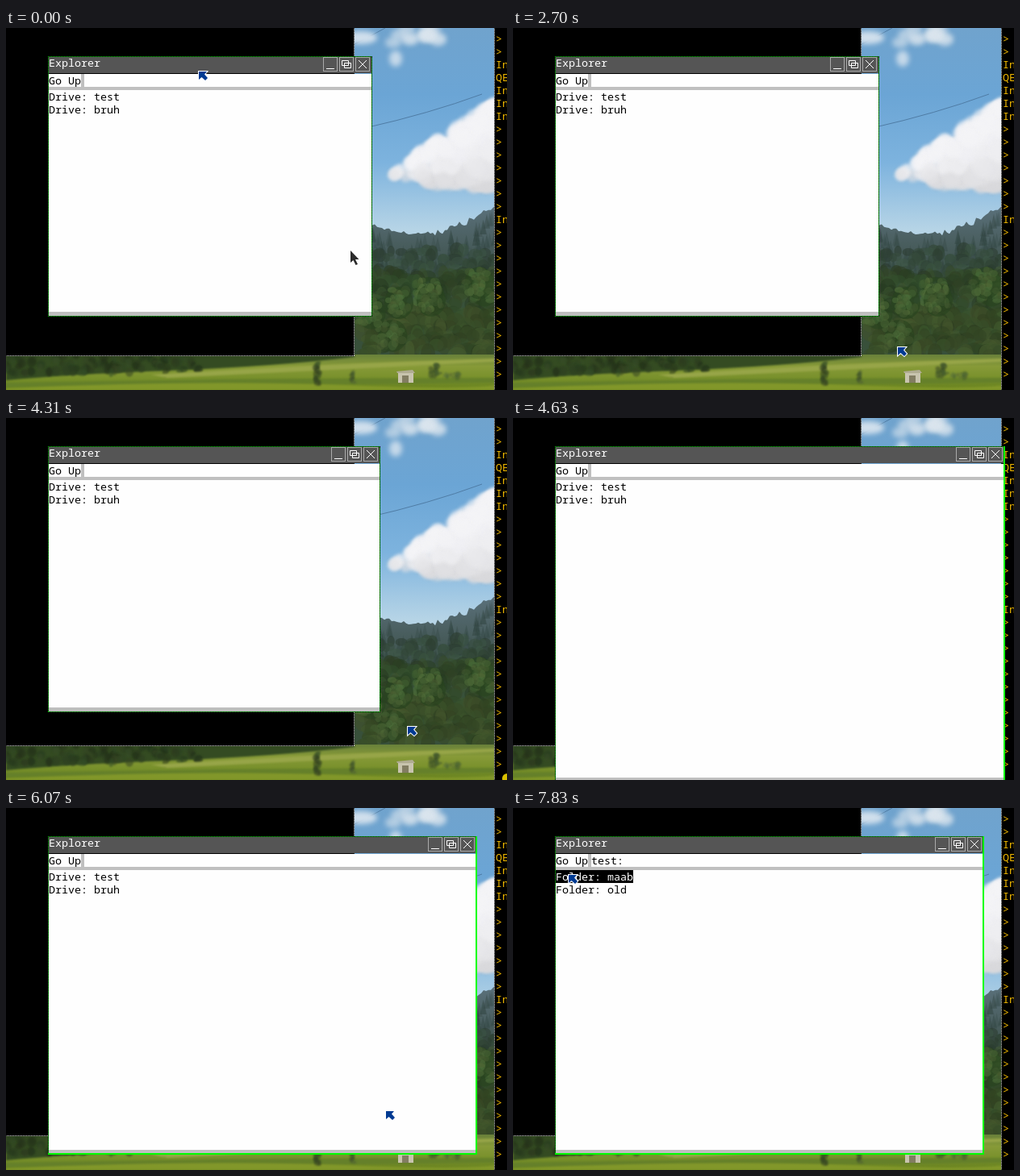
Animation of 621x449 px, one loop 7.99 s. Source, as an HTML page with a canvas:

```html
<!DOCTYPE html>
<html lang="en">
<head>
<meta charset="utf-8">
<title>Explorer</title>
<style>
  html, body { margin: 0; width: 100%; height: 100%; overflow: hidden; background: #000; }
  #stage {
    position: relative; width: 621px; height: 449px; overflow: hidden;
    font: 300 13.333px/16px "Noto Sans Mono", "DejaVu Sans Mono", monospace;
    --dot: #ccc;
    --time: 7990ms -30ms infinite;
  }
  #stage * { position: absolute; box-sizing: border-box; }
  .text { white-space: pre; margin: 0; font: inherit; }
  .dotted {
    --x: repeating-linear-gradient(90deg, var(--dot) 0 1px, #111 1px 2px);
    --y: repeating-linear-gradient(var(--dot) 0 1px, #111 1px 2px);
    background: var(--x) 0 0 / 100% 1px no-repeat, var(--x) 0 100% / 100% 1px no-repeat,
                var(--y) 0 0 / 1px 100% no-repeat, var(--y) 100% 0 / 1px 100% no-repeat;
  }
  #shell { left: -1px; top: -1px; width: 433px; height: 408px; background-color: #000; }
  #terminal { left: 605px; top: -1px; width: 20px; height: 460px; background-color: #000; }
  #terminal .text { left: 2px; top: 6px; color: #f0b800; }
  #spot {
    left: 615px; top: 441px; width: 12px; height: 12px; border-radius: 50%; background: #d8c000;
    animation: blip var(--time) step-end;
  }

  #window { left: 52px; top: 35px; animation: resize var(--time); }
  #title { left: 1px; right: 1px; top: 1px; height: 20px; background: #555; color: #fff; }
  #title .text { top: -1px; }
  #title svg { top: 0; width: 18px; height: 18px; fill: #555; stroke: #fff; }
  #title rect { x: .5px; y: .5px; width: 17px; height: 17px; stroke: #aaa; }
  #path, #list { left: 1px; right: 1px; background: #fefefe; border: 0 solid #bfbfbf; }
  #path { top: 22px; height: 20px; border-bottom-width: 4px; }
  #split { left: 40px; width: 4px; height: 16px; background: #bfbfbf; }
  #place { left: 44px; }
  #list { top: 42px; bottom: 1px; border-bottom-width: 5px; }
  #list .text + .text { top: 16px; }
  #edge { inset: 0; --dot: #0c0; }
  #lit { inset: 0; border: solid #0f0; border-width: 0 2px 2px 0; animation: light var(--time) step-end; }

  .before { animation: leave var(--time) step-end; }
  .after { animation: enter var(--time) step-end; }
  .row { animation: pick var(--time) step-end; }
  .cursor { width: 16px; height: 22px; overflow: visible; }
  .cursor path { paint-order: stroke; stroke: #fff; stroke-width: 2; }
  #guest { animation: guest var(--time); }
  #host { animation: host var(--time); }

  /* One picture lasts 2%; each steps() count is the number of pictures to the next key. */
  @keyframes host {
    0% { left: 427px; top: 276px; visibility: visible; animation-timing-function: steps(8); }
    16% { left: 261px; top: 71px; animation-timing-function: steps(3); }
    22% { left: 235px; top: 39px; visibility: visible; animation-timing-function: steps(1); }
    24%, 100% { left: 235px; top: 39px; visibility: hidden; }
  }
  @keyframes guest {
    0%, 22% { left: 238px; top: 53px; animation-timing-function: steps(3); }
    28% { left: 238px; top: 70px; animation-timing-function: steps(3); }
    34% { left: 476px; top: 395px; animation-timing-function: steps(2); }
    38% { left: 468px; top: 417px; animation-timing-function: steps(3); }
    44% { left: 449px; top: 353px; animation-timing-function: steps(4); }
    52% { left: 463px; top: 364px; animation-timing-function: steps(1); }
    54% { left: 497px; top: 382px; animation-timing-function: steps(2); }
    58% { left: 625px; top: 465px; animation-timing-function: steps(7); }
    72% { left: 577px; top: 420px; animation-timing-function: steps(2); }
    76% { left: 470px; top: 375px; animation-timing-function: steps(3); }
    82%, 86% { left: -30px; top: 132px; animation-timing-function: steps(1); }
    88% { left: 28px; top: 93px; animation-timing-function: steps(3); }
    94%, 100% { left: 68px; top: 82px; }
  }
  @keyframes resize {
    0%, 44% { width: 402px; height: 323px; animation-timing-function: steps(5); }
    54% { width: 412px; height: 330px; animation-timing-function: steps(2); }
    58% { width: 558px; height: 417px; animation-timing-function: steps(2); }
    62% { width: 589px; height: 441px; animation-timing-function: steps(5); }
    72%, 100% { width: 532px; height: 395px; }
  }
  @keyframes blip { 0%, 56%, 100% { visibility: hidden; } 54% { visibility: visible; } }
  @keyframes light { 0% { visibility: hidden; } 56%, 100% { visibility: visible; } }
  @keyframes leave { 0% { opacity: 1; } 96%, 100% { opacity: 0; } }
  @keyframes enter { 0% { opacity: 0; } 96%, 100% { opacity: 1; } }
  @keyframes pick {
    0% { color: #000; background: #fefefe; }
    92%, 100% { color: #fff; background: #000; }
  }
</style>
</head>
<body>
<div id="stage">
  <canvas id="photo" width="621" height="449"></canvas>
  <div id="shell" class="dotted"></div>
  <div id="terminal" class="dotted"><pre class="text"></pre></div>
  <div id="spot"></div>
  <div id="window">
    <div id="title">
      <span class="text">Explorer</span>
      <svg style="right:42px"><rect/><path d="M4 14.5H14"/></svg>
      <svg style="right:22px"><rect/><path d="M3.5 4.5H11.5V10.5H3.5ZM6.5 7.5H14.5V13.5H6.5Z"/></svg>
      <svg style="right:2px"><rect/><path d="M4 4L14 14M14 4L4 14"/></svg>
    </div>
    <div id="path">
      <span class="text">Go Up</span><div id="split"></div><span id="place" class="text after">test:</span>
    </div>
    <div id="list">
      <div class="before"><span class="text row">Drive: test</span><span class="text">Drive: bruh</span></div>
      <div class="after"><span class="text row">Folder: maab</span><span class="text">Folder: old</span></div>
    </div>
    <div id="edge" class="dotted"></div>
    <div id="lit"></div>
  </div>
  <svg id="guest" class="cursor"><path fill="#003a92" d="M1 1H11L8 4.5L12 9L9 12L4.5 8L1 11Z"/></svg>
  <svg id="host" class="cursor"><path fill="#2b2b2b" d="M0 0V15L3.5 12L6.5 18L9 17L6 11H10.5Z"/></svg>
</div>
<script>
const c = document.getElementById('photo').getContext('2d');
let seed = 7;
const rnd = () => (seed = seed * 16807 % 2147483647) / 2147483647;
const between = (a, b) => a + (b - a) * rnd();

function fade(y0, y1, ...colors) {
  const g = c.createLinearGradient(0, y0, 0, y1);
  colors.forEach((color, i) => g.addColorStop(i / (colors.length - 1), color));
  return g;
}

function blob(fill, x, y, rx, ry = rx) {
  c.fillStyle = fill;
  c.beginPath();
  c.ellipse(x, y, rx, ry, 0, 0, 7);
  c.fill();
}

function path(d, fill) {
  c.fillStyle = fill;
  c.fill(new Path2D(d));
}

function foliage(count, x, y, w, h, size, hue, sat, light) {
  for (let i = 0; i < count; i++) {
    const color = `hsla(${hue + between(-8, 8)},${sat}%,${light + between(-5, 5)}%,.55)`;
    blob(color, x + w * rnd(), y + h * i / count, size * between(.5, 1), size * between(.5, 1.1));
  }
}

function paintSky() {
  c.fillStyle = fade(0, 250, '#70a3cd', '#6ba5d5', '#7db3de', '#b6d4e6');
  c.fillRect(0, 0, 621, 449);
  c.strokeStyle = '#4f7ca5';
  c.stroke(new Path2D('M432 20Q452 10 470 0M445 124Q525 106 590 82'));

  c.filter = 'blur(3px)';
  for (let i = 0; i < 14; i++) blob('#dce6ef99', between(480, 540), between(-4, 20), 10, 7);
  blob('#d0dfec', 440, 12, 20, 8);
  blob('#c4d8e9', 483, 38, 8, 10);

  // The big cloud widens from its left tip to the right.
  c.filter = 'blur(2px)';
  for (let i = 0; i < 260; i++) {
    const t = Math.sqrt(rnd()), low = rnd(), r = 7 + 7 * t;
    const top = 182 - 100 * t ** .8 + r, bottom = 186 + 22 * Math.sin(2.2 * t) - r;
    const shade = 243 - 28 * low ** 3;
    blob(`rgba(${shade},${shade},${shade + 3},.7)`, 476 + 134 * t, top + Math.max(0, bottom - top) * low, r);
  }
  c.filter = 'none';
}

function paintForest() {
  const ridge = x => 255 - .0036 * (x - 510) ** 2;
  c.filter = 'blur(.7px)';
  c.fillStyle = fade(222, 330, '#5a707a', '#465a59', '#38503a');
  c.beginPath();
  c.moveTo(430, 410);
  for (let x = 430; x < 621; x += 3) c.lineTo(x, ridge(x) + between(-4, 3) * (x > 530 ? 1.4 : .5));
  c.lineTo(621, 410);
  c.fill();
  for (let i = 0; i < 90; i++) {
    const x = between(440, 610), y = ridge(x) + between(5, 45);
    path(`M${x - 4} ${y + 13}L${x} ${y - 5}L${x + 4} ${y + 13}Z`, `rgba(48,68,64,${between(.2, .5)})`);
  }
  foliage(110, 440, 275, 172, 40, 9, 135, 17, 24);
  foliage(220, 440, 304, 172, 65, 11, 102, 28, 22);
  foliage(170, 440, 350, 172, 56, 12, 92, 32, 23);
  for (let i = 0; i < 7; i++) {
    const x = between(445, 590), y = between(300, 370);
    blob('#29431fa0', x + 6, y + 16, 18, 20);
    foliage(28, x - 12, y, 30, 30, 6, 94, 31, 29);
  }
  c.filter = 'none';
}

function paintField() {
  c.fillStyle = fade(405, 449, '#68803a', '#879a38', '#78902b', '#68821f');
  c.fillRect(0, 405, 621, 44);
  c.filter = 'blur(1px)';
  path('M0 400H432V408Q330 420 200 425T0 437Z', '#344b22');
  foliage(130, 0, 406, 240, 22, 6, 95, 32, 18);
  path('M180 430Q400 416 606 410V414Q400 424 200 434Z', '#97a548');
  path('M0 440Q300 434 606 434V440Q300 444 0 446Z', '#65802a');
  path('M0 447Q240 436 420 443T621 440V449H0Z', '#82972a');
  foliage(18, 382, 415, 7, 28, 4, 88, 34, 22);
  foliage(8, 428, 427, 5, 14, 3, 88, 30, 25);
  foliage(12, 526, 417, 9, 16, 4, 88, 32, 25);
  foliage(14, 535, 428, 28, 6, 3, 85, 32, 29);
  c.filter = 'none';
  path('M484 426L504 424L507 428H485Z', '#b0ac92');
  path('M486 428H505V440H486Z', '#c8c4ae');
  path('M491 431H499V440H491Z', '#827d62');
}

paintSky();
paintForest();
paintField();

const prompts = n => '>\n'.repeat(n);
document.querySelector('#terminal pre').textContent =
  prompts(1) + prompts(1) + 'In\nQE\nIn\nIn\nIn\n' + prompts(7) + 'In\n' + prompts(12);
</script>
</body>
</html>
```
